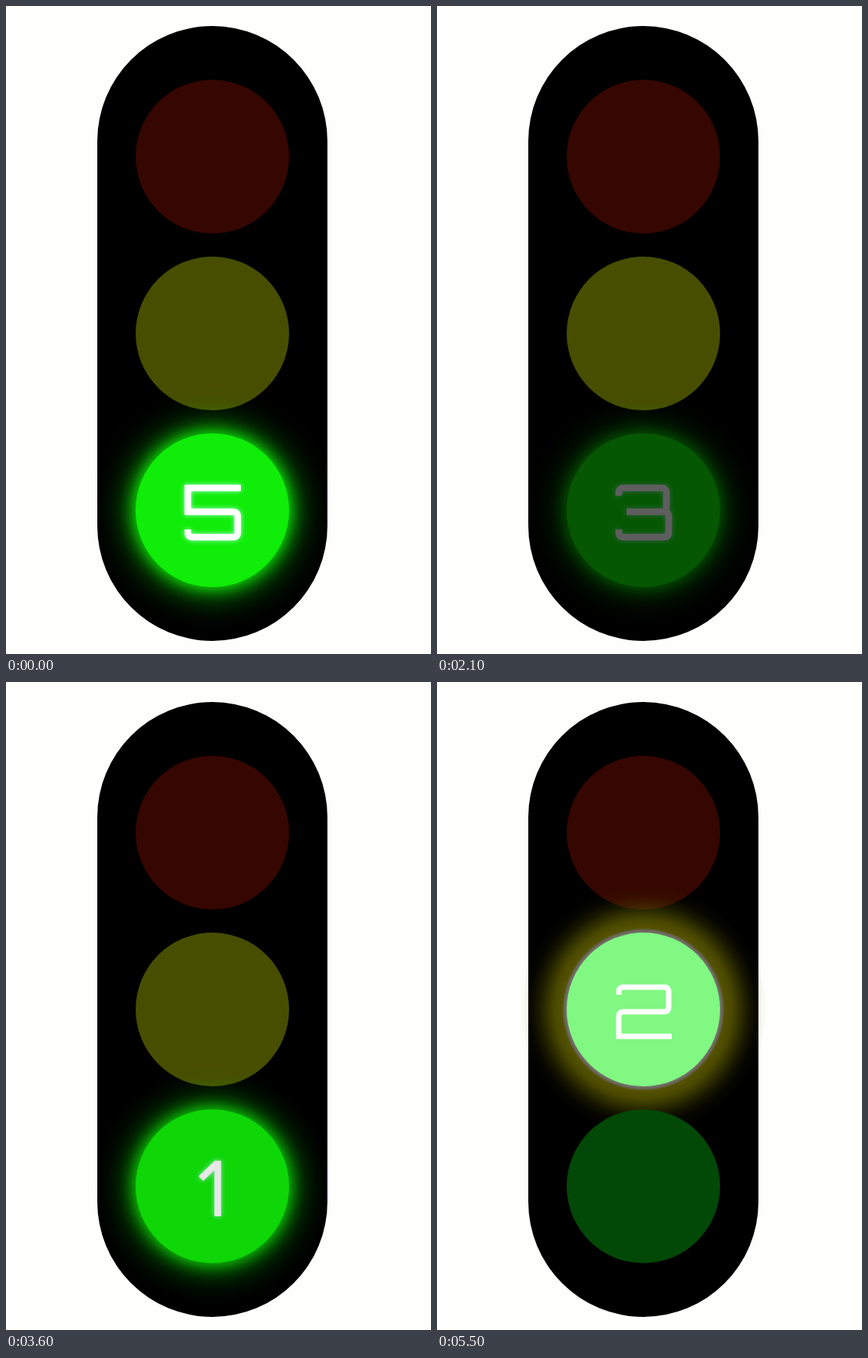
Animation of 554x843 px, one loop 5.6 s. Source, as an HTML page:

```html
<!DOCTYPE html>
<html lang="en">
<head>
<meta charset="utf-8">
<title>Traffic light countdown</title>
<style>
html, body { margin: 0; width: 100%; height: 100%; overflow: hidden; background: #fefefc; }
.stage { position: relative; width: 554px; height: 843px; overflow: hidden; }
.housing { position: absolute; left: 119px; top: 26px; width: 300px; height: 800px; border-radius: 150px; background: #000; }
.light { position: absolute; left: 169px; width: 200px; height: 200px; border-radius: 50%; }
.light svg { position: absolute; inset: 0; overflow: visible; fill: none; stroke: #fff; }
#red { top: 96px; background: #350700; }
#yellow { top: 326px; background: #474e00; }
#yellow.on { background: #80f882; }
#yellow.on::before {
  content: ""; position: absolute; inset: -70px; border-radius: 50%; z-index: -1;
  background: radial-gradient(circle closest-side,
    #747068 101px, #68645a 103px, rgb(84 82 0) 106px, rgb(84 82 0 / .88) 116px,
    rgb(84 84 0 / .58) 126px, rgb(84 84 0 / .28) 137px, rgb(84 84 0 / .08) 148px, rgb(84 84 0 / 0) 162px);
}
#yellow { z-index: 0; }
#yellow.on { background: none; }
#yellow.on::after { content: ""; position: absolute; inset: 0; border-radius: 50%; background: #80f882; z-index: -1; }
#yellow svg { stroke-width: 7; }
#green { top: 556px; background: #024806; z-index: 1; }
#green.on { background: #10ed08; box-shadow: 0 0 50px #10ed08, 0 0 20px #10ed08; }
#green svg { stroke-width: 8.6; filter: drop-shadow(0 0 3px #a0ffd0); }
</style>
</head>
<body>
<div class="stage">
  <div class="housing"></div>
  <div class="light" id="red"></div>
  <div class="light" id="yellow"><svg width="200" height="200"><path/></svg></div>
  <div class="light" id="green"><svg width="200" height="200"><path/></svg></div>
</div>
<script>
const LOOP = 5600, STEP = 100;
const BLINK_START = 1300, BLINK_LENGTH = 1020, YELLOW_START = 4500;

// Digit strokes in the coordinates of a 200 px light.
const hook = 'M68 81V77Q68 71 74 71';
const lowerBowl = 'H127Q133 102 133 108V129Q133 135 127 135H74Q68 135 68 129V125';
const digits = {
  1: 'M107 139V71H105L85 90',
  2: hook + 'H127Q133 71 133 77V97Q133 103 127 103H74Q68 103 68 109V135H137',
  3: hook + 'H124Q130 71 130 77V96Q130 102 125 102M78 102' + lowerBowl,
  4: 'M137 123H68V114L115 71H120V139',
  5: 'M137 71H68V102' + lowerBowl
};

// Start time, digit
const counts = [[0, 5], [300, 4], [1300, 3], [2400, 2], [3400, 1], [4500, 3], [5500, 2]];

const [yellow, green] = ['yellow', 'green'].map(id => document.getElementById(id));

// cubic-bezier(.42, 0, .58, 1)
function easeInOut(x) {
  let lo = 0, hi = 1;
  for (let i = 0; i < 20; i++) {
    const u = (lo + hi) / 2;
    const bx = 1.26 * u * (1 - u) ** 2 + 1.74 * u * u * (1 - u) + u ** 3;
    if (bx < x) lo = u; else hi = u;
  }
  return lo * lo * (3 - 2 * lo);
}

function blink(t) {
  if (t < BLINK_START || t >= YELLOW_START) return 1;
  const cycles = Math.min((t - BLINK_START) / BLINK_LENGTH, 3) % 2;
  return 1 - 0.7 * easeInOut(cycles > 1 ? 2 - cycles : cycles);
}

function setLight(light, on, digit) {
  light.classList.toggle('on', on);
  light.querySelector('path').setAttribute('d', on ? digits[digit] : '');
}

function draw(now) {
  const t = Math.floor(now % LOOP / STEP) * STEP;
  const digit = counts.findLast(([start]) => start <= t)[1];
  const isYellow = t >= YELLOW_START;
  setLight(yellow, isYellow, digit);
  setLight(green, !isYellow, digit);
  green.style.opacity = blink(t);
}

let origin;
function tick(now) {
  origin ??= now;
  draw(now - origin);
  requestAnimationFrame(tick);
}
draw(0);
requestAnimationFrame(tick);
</script>
</body>
</html>
```
